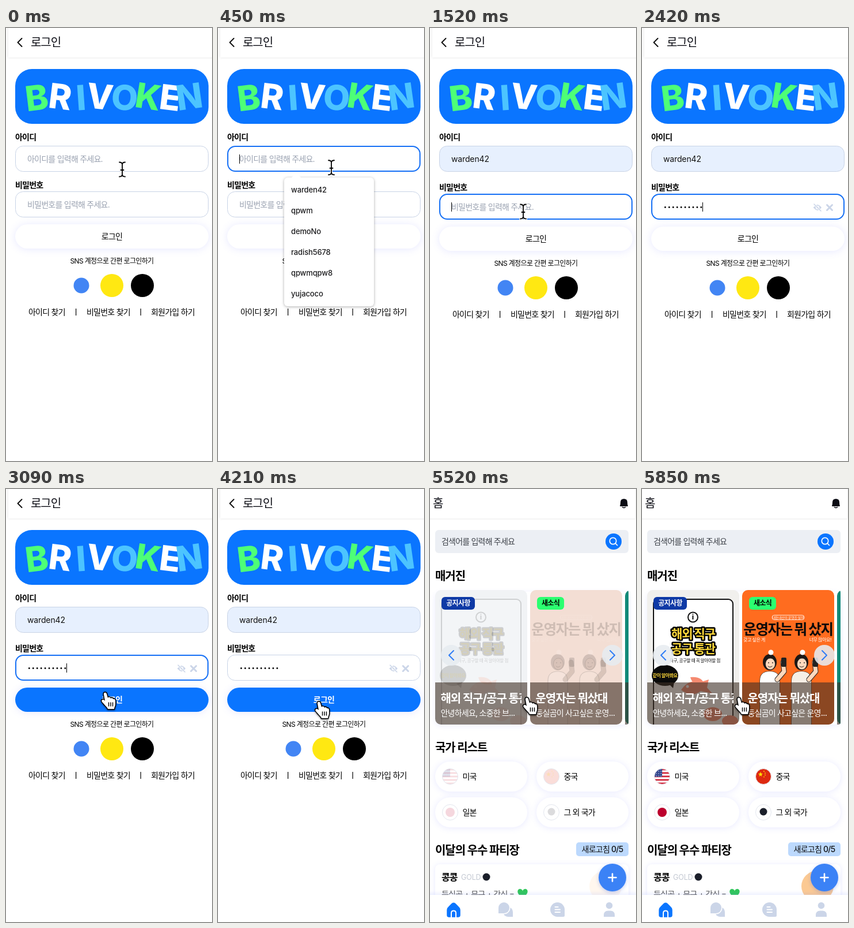
Recreate the animation shown at these times as an HTML page with a canvas. Size 358 by 750 pixels, loop 5.89 s.

```html
<!DOCTYPE html>
<html lang="ko">
<head>
<meta charset="utf-8">
<title>로그인</title>
<style>
html, body { margin: 0; width: 100%; height: 100%; overflow: hidden; background: #fff; }
canvas { display: block; width: 358px; height: 750px; }
</style>
</head>
<body>
<canvas id="stage"></canvas>
<script>
const W = 358, H = 750, LOOP = 5890;
const canvas = document.getElementById('stage');
const c = canvas.getContext('2d');
const dpr = window.devicePixelRatio || 1;
canvas.width = W * dpr;
canvas.height = H * dpr;

const BLUE = '#0a75ff', LINE = '#c8d3e6', INK = '#0b0c14', FILL = '#e7f0fe', ICON = '#cbd5e8';
const FONT = 'Inter, Pretendard, "Noto Sans CJK KR", "Noto Sans CJK", sans-serif';

// Moments of the story, in ms
const T = {
  focusId: 270, dropOpen: 360, pick: 1030, focusPw: 1480, type: 1700, move: 2700,
  hover: 2950, caretOff: 3300, submit: 3640, home: 4450, ready: 5390, images: 5480
};
const USER = 'warden42';
const SAVED = [USER, 'qpwm', 'demoNo', 'radish5678', 'qpwmqpw8', 'yujacoco'];

// Pointer path: time, x, y
const PATH = [
  [120, 202, 245], [260, 201, 232], [340, 201, 232], [680, 185, 271], [1060, 185, 271],
  [1460, 162, 318], [2700, 162, 318], [3060, 173, 353], [3120, 173, 353], [3270, 176, 369],
  [5180, 176, 369], [5260, 168, 359], [5330, 168, 359], [5500, 169, 362]
];

const clamp = v => Math.max(0, Math.min(1, v));
const ease = v => v * v * (3 - 2 * v);

function pointer(t) {
  let a = PATH[0];
  for (const b of PATH) {
    if (t < b[0]) {
      if (a === b) break;
      const k = ease(clamp((t - a[0]) / (b[0] - a[0])));
      return { x: a[1] + (b[1] - a[1]) * k, y: a[2] + (b[2] - a[2]) * k };
    }
    a = b;
  }
  return { x: a[1], y: a[2] };
}

function text(s, x, cy, size, weight = 400, color = INK, align = 'left') {
  c.font = `${weight} ${size}px ${FONT}`;
  c.letterSpacing = (/[가-힣]/.test(s) ? -0.054 : -0.01) * size + 'px';
  c.textAlign = align;
  c.fillStyle = color;
  c.fillText(s, x, cy + size * 0.37);
}

function box(x, y, w, h, r, fill, stroke, lw = 1) {
  c.beginPath();
  c.roundRect(x, y, w, h, r);
  if (fill) { c.fillStyle = fill; c.fill(); }
  if (stroke) { c.strokeStyle = stroke; c.lineWidth = lw; c.stroke(); }
}

function oval(x, y, rx, ry, fill, stroke, lw = 1) {
  c.beginPath();
  c.ellipse(x, y, rx, ry, 0, 0, Math.PI * 2);
  if (fill) { c.fillStyle = fill; c.fill(); }
  if (stroke) { c.strokeStyle = stroke; c.lineWidth = lw; c.stroke(); }
}
const dot = (x, y, r, fill, stroke, lw) => oval(x, y, r, r, fill, stroke, lw);

function path(d, x, y, fill, stroke, lw = 2) {
  const p = new Path2D(d);
  c.save();
  c.translate(x, y);
  c.lineCap = c.lineJoin = 'round';
  if (stroke) { c.strokeStyle = stroke; c.lineWidth = lw; c.stroke(p); }
  if (fill) { c.fillStyle = fill; c.fill(p); }
  c.restore();
}

function shadowed(color, blur, dy, draw) {
  c.save();
  c.shadowColor = color;
  c.shadowBlur = blur * dpr;
  c.shadowOffsetY = dy * dpr;
  draw();
  c.restore();
}

function faded(alpha, draw) {
  if (alpha <= 0) return;
  c.save();
  c.globalAlpha *= alpha;
  draw();
  c.restore();
}

function clipped(x, y, w, h, r, draw) {
  c.save();
  c.beginPath();
  c.roundRect(x, y, w, h, r);
  c.clip();
  draw();
  c.restore();
}

/* ---------- pointer shapes ---------- */

const ARROW = 'M0 0V23L5.5 18L9.3 27L13 25.4L9.2 16.8H16Z';
const HAND = 'M-3 3C-4-1 1-2 2 2L4 9C5 7 8 7 9 10C10 8 13 9 13 11C15 10 17 11 17 14V20C17 23 15 25 15 28H4C3 25-1 22-4 18C-7 15-8 13-5 12C-4 11-2 13-1 14Z';
const BEAM = 'M-5-12.5Q0-12.5 0-8.5V8.5Q0 12.5-5 12.5M5-12.5Q0-12.5 0-8.5M0 8.5Q0 12.5 5 12.5M-2.5 1H2.5';

function drawPointer(kind, { x, y }) {
  if (kind === 'beam') {
    path(BEAM, x, y, null, '#fff', 4);
    path(BEAM, x, y, null, '#000', 1.8);
  } else if (kind === 'hand') {
    shadowed('rgba(0,0,0,.35)', 3, 1.5, () => path(HAND, x, y, '#fff', '#000', 3));
    path('M5.5 17V23M9 17V23M12.5 17V23', x, y, null, '#000', 1.4);
  } else {
    shadowed('rgba(0,0,0,.35)', 3, 1.5, () => path(ARROW, x, y, '#000', '#fff', 3));
  }
}

/* ---------- login ---------- */

function header(x, w) {
  shadowed('rgba(0,0,0,.13)', 4, 0, () => box(x, -8, w, 59, 0, '#fff'));
}

function banner() {
  box(16, 71, 336, 95, 29, BLUE);
  const green = '#4dff77', sky = '#4cc4ff';
  const xs = [53, 94, 130, 163, 206, 247, 285, 318];
  const tints = [green, '#fff', sky, '#fff', sky, green, '#fff', sky];
  const tilt = [-7, 7, -4, 6, 5, 9, 7, -8];
  [...'BRIVOKEN'].forEach((ch, i) => {
    c.save();
    c.translate(xs[i], 119 + (i % 2 ? -1 : 1));
    c.rotate(tilt[i] * Math.PI / 180);
    text(ch, 0, 0, 60, 800, tints[i], 'center');
    c.restore();
  });
}

function field(y, focused, fill) {
  if (focused) box(17, y + 1, 334, 43, 13, fill, '#1670f5', 2);
  else box(16.5, y + 0.5, 335, 44, 13, fill, LINE);
}

function caret(x, cy) {
  c.fillStyle = '#000';
  c.fillRect(x, cy - 8, 1, 16);
}

function typedCount(t) {
  let n = 0;
  for (let i = 0; i < 8; i++) if (t >= T.type + i * 72) n++;
  return n + (t >= 2330) + (t >= 2420);
}

function passwordTools(y) {
  path('M-6.5 0Q0-9 6.5 0Q0 9-6.5 0Z', 305, y, ICON, ICON, 1);
  dot(305, y, 2.6, null, '#fff', 1.3);
  path('M-5-5L5 5', 305, y, null, '#fff', 3);
  path('M-6-6L6 6', 305, y, null, ICON, 1.6);
  path('M-4.5-4.5L4.5 4.5M4.5-4.5L-4.5 4.5', 326, y, null, ICON, 3);
}

function dropdown(t, hovering) {
  shadowed('rgba(0,0,0,.32)', 5, 1, () => {
    c.beginPath();
    c.roundRect(115, 259, 156, 223, 6);
    c.fillStyle = '#fff';
    c.fill();
  });
  path('M-9 1L0-8L9 1Z', 136, 259, '#fff');
  if (hovering) {
    box(119, 262, 148, 36, 4, '#eeeeee');
    path('M-4-4L4 4M4-4L-4 4', 249, 280, null, '#444', 1.5);
  }
  SAVED.forEach((name, i) => text(name, 127, 280.5 + i * 36, 13, 500, '#1c1c1e'));
}

function login(t, p) {
  const filled = t >= T.pick;
  const open = t >= T.dropOpen && t < T.pick + 120;
  const hovering = open && p.y > 262;
  const dy = filled ? 4 : 0;
  const idFocus = t >= T.focusId && t < T.focusPw;
  const pwFocus = t >= T.focusPw && t < T.submit;
  const hasText = filled || hovering;

  header(4, 370);
  path('M3.5-7L-3.5 0L3.5 7', 24, 25, null, '#111', 2);
  text('로그인', 43, 25, 20, 500);
  banner();

  text('아이디', 16, 189, 14, 600, '#000');
  field(204, idFocus, hasText ? FILL : '#fff');
  if (filled) text(USER, 37, 227, 14, 400, '#111');
  else if (hovering) text(USER, 37, 227.5, 13, 400, '#000');
  else text('아이디를 입력해 주세요.', 37, 227, 14, 400, '#9aa2b1');
  if (idFocus && !hasText) caret(37, 227);

  c.save();
  c.translate(0, dy);
  text('비밀번호', 16, 272, 14, 600, '#000');
  field(283, pwFocus, '#fff');
  const n = typedCount(t);
  if (n) {
    for (let i = 0; i < n; i++) dot(40.3 + i * 6.95, 306.5, 1.4, '#000');
    passwordTools(307);
  } else {
    text('비밀번호를 입력해 주세요.', 37, 306, 14, 400, '#9aa2b1');
  }
  if (pwFocus && t < T.caretOff) caret(37 + n * 6.8, 306);

  const hot = clamp((t - T.hover) / 110);
  shadowed('rgba(110,120,255,.17)', 14, 1, () => box(16, 340, 336, 42, 21, '#fff'));
  faded(1 - hot, () => text('로그인', 184, 361, 14, 500, '#000', 'center'));
  faded(hot, () => {
    box(16, 340, 336, 42, 21, BLUE);
    text('로그인', 184, 361, 14, 600, '#fff', 'center');
  });

  text('SNS 계정으로 간편 로그인하기', 184, 404, 12, 400, '#000', 'center');
  dot(131, 446, 13.5, '#4285f4');
  dot(184, 446, 20, '#ffe812');
  dot(237, 446, 20, '#000');
  text('아이디 찾기', 39, 492, 14, 400, '#000');
  text('비밀번호 찾기', 140, 492, 14, 400, '#000');
  text('회원가입 하기', 252, 492, 14, 400, '#000');
  c.fillStyle = '#000';
  c.fillRect(121, 486, 1.2, 12);
  c.fillRect(233.5, 486, 1.2, 12);
  c.restore();

  if (open) {
    const alpha = t < T.pick ? clamp((t - T.dropOpen) / 60) : 1 - (t - T.pick) / 120;
    faded(alpha, () => dropdown(t, hovering));
  }

  if (t >= T.type && t < T.move) return;
  const within = (a, b) => p.y >= a && p.y <= b;
  let kind = 'arrow';
  if (open && within(258, 482)) kind = 'arrow';
  else if (within(204, 249) || within(283 + dy, 328 + dy)) kind = 'beam';
  else if (within(340 + dy, 382 + dy)) kind = 'hand';
  drawPointer(kind, p);
}

/* ---------- home ---------- */

function loader() {
  for (let i = 0; i < 5; i++) dot(113 + i * 32, 338, 12, BLUE);
  text('열심히 불러오는 중', 177, 372, 18, 500, '#000', 'center');
}

function nav() {
  shadowed('rgba(110,140,255,.2)', 8, -1, () => box(-10, 703, 378, 60, 0, '#fff'));
  path('M-11 0Q-11-3-8-5.5L-3-10.5Q0-13 3-10.5L8-5.5Q11-3 11 0V9Q11 12 8 12H-8Q-11 12-11 9Z', 41, 729, BLUE, BLUE, 1.5);
  path('M-4 13V5.5Q-4 1.5 0 1.5T4 5.5V13', 41, 729, null, '#fff', 2);
  path('M8 17H0A8.5 8.5 0 1 1 8.5 8.5V17Z', 135.5, 724, ICON);
  path('M-9.5 9.5V0A9.5 9.5 0 1 1 0 9.5Z', 128.5, 725.5, ICON, '#fff', 3);
  path('M12.5 10Q12.5 12.5 10 12.5H0A12.5 12.5 0 1 1 12.5 0Z', 221.5, 728.5, ICON);
  path('M-4-4.5H1M-4 0H4.5M-4 4.5H4.5', 221.5, 728.5, null, '#fff', 2);
  dot(311.5, 721.5, 5.8, ICON);
  path('M-9.5 12V9Q-9.5 1.5-2 1.5H2Q9.5 1.5 9.5 9V12Z', 311.5, 729, ICON);
}

function addButton() {
  shadowed('rgba(60,100,230,.3)', 6, 2, () => dot(317, 673, 24, '#3b82f6'));
  path('M-6.5 0H6.5M0-6.5V6.5', 317, 673, null, '#fff', 2.6);
}

function badge(s, x, w, fill, color) {
  box(x, 187, w, 22, 6, fill);
  text(s, x + w / 2, 198, 12, 700, color, 'center');
}

function outlined(s, x, cy, size, fill) {
  c.font = `900 ${size}px ${FONT}`;
  c.letterSpacing = -0.054 * size + 'px';
  c.textAlign = 'center';
  c.lineJoin = 'round';
  c.lineWidth = 5;
  c.strokeStyle = '#000';
  c.strokeText(s, x, cy + size * 0.37);
  text(s, x, cy, size, 900, fill, 'center');
}

function noticeArt() {
  box(9, 175, 160, 233, 0, '#f1f0ed');
  box(20, 191, 138, 240, 8, '#fff', '#111', 2);
  dot(88.5, 222, 8.5, null, '#111', 2);
  text('i', 88.5, 222, 12, 800, '#111', 'center');
  outlined('해외 직구', 89, 250, 21, '#ffd93b');
  outlined('공구 통관', 89, 276, 21, '#ffd93b');
  text('직구, 공구할 때 꼭 알아야할 점', 92, 297, 7.5, 500, '#111', 'center');
  oval(40, 323, 23, 18, '#0a0a0a');
  path('M0 0L8 8L10-3Z', 46, 337, '#0a0a0a');
  text('같이 알아봐요', 40, 323, 8, 700, '#ffd93b', 'center');
  const salmon = '#f58a70';
  path('M0 12Q14-8 32-1L48-6L45 8L54 18L34 14Q18 26 0 12Z', 68, 336, salmon);
  path('M0 0Q4 16 24 12Q20-2 0 0Z', 84, 326, salmon);
  dot(79, 342, 2.5, '#fff');
  oval(123, 390, 16, 12, salmon);
  oval(153, 402, 14, 10, salmon);
}

function shopper(x, flip, hair, shirt) {
  c.save();
  c.translate(x, 0);
  c.scale(flip, 1);
  path('M-17 408V332Q-17 316 0 316T17 332V408Z', 0, 0, shirt, '#222', 1.2);
  path('M13 330L25 316L23 300', 0, 0, null, '#222', 9);
  path('M13 330L25 316L23 300', 0, 0, null, '#ffd9bd', 7);
  oval(0, 300, 12, 14, hair);
  oval(1, 303, 8.5, 10, '#ffd9bd', '#222', 0.8);
  path('M-4 0Q-1 3 3 0', 1, 307, null, '#222', 1);
  dot(-2, 301, 0.9, '#222');
  dot(5, 301, 0.9, '#222');
  dot(2, 283, 4.5, '#fff');
  box(20, 292, 9, 16, 2, '#222');
  c.restore();
}

function newsArt() {
  box(174, 175, 160, 233, 0, '#ff6c1f');
  box(226, 218.5, 56, 8, 4, null, '#fff', 0.8);
  text('내돈내산의 운영진 살까', 254, 222.5, 6, 500, '#fff', 'center');
  text('운영자는 뭐 샀지', 254, 243, 24.5, 900, '#0a0a0a', 'center');
  text('갖고 싶은 게', 176, 261, 8, 500, '#fff');
  text('너무 많아요!', 329, 261, 8, 500, '#fff', 'right');
  shopper(222, 1, '#1c1715', '#fff');
  shopper(277, 1, '#1c1715', '#f6efe6');
}

function slide(x, art, alpha, title, sub) {
  clipped(x, 175, 160, 233, 10, () => {
    box(x, 175, 160, 233, 0, '#f1f3f7');
    faded(alpha, art);
    box(x, 335, 160, 73, 0, 'rgba(62,48,38,.6)');
    clipped(x + 9, 340, 141, 66, 0, () => {
      text(title, x + 9.5, 363, 20, 700, '#fff');
      text(sub, x + 9.5, 388, 14, 500, '#fff');
    });
  });
}

function arrowButton(x, dir) {
  dot(x, 288, 18, 'rgba(232,236,241,.88)');
  path(`M${-4 * dir}-8L${4 * dir} 0L${-4 * dir} 8`, x, 288, null, '#2f7df6', 2);
}

function carousel(alpha) {
  shadowed('rgba(110,120,255,.14)', 10, 2, () => box(9, 178, 336, 230, 10, '#fff'));
  clipped(9, 175, 336, 233, 4, () => {
    slide(9, noticeArt, alpha, '해외 직구/공구 통관', '안녕하세요, 소중한 브...');
    slide(174, newsArt, alpha, '운영자는 뭐샀대', '둥실곰이 사고싶은 운영...');
    box(339, 175, 160, 233, 10, '#128a78');
    box(339, 335, 160, 73, 0, 'rgba(62,48,38,.6)');
  });
  badge('공지사항', 20, 58, '#0f3aa6', '#fff');
  badge('새소식', 186, 47, '#2bff70', '#000');
  arrowButton(37, -1);
  arrowButton(317, 1);
}

const FLAGS = {
  '미국'(x, y) {
    for (let i = 0; i < 9; i++) box(x - 14, y - 13.5 + i * 3, 28, 3, 0, i % 2 ? '#fff' : '#d2283c');
    box(x - 14, y - 14, 14, 14.5, 0, '#33478f');
    for (let i = 0; i < 9; i++) dot(x - 10 + (i % 3) * 4, y - 9 + Math.floor(i / 3) * 4, 0.7, '#fff');
  },
  '중국'(x, y) {
    box(x - 14, y - 14, 28, 28, 0, '#de2910');
    path('M0-4L1.2-1.2L4-1L1.8 1L2.5 4L0 2.3L-2.5 4L-1.8 1L-4-1L-1.2-1.2Z', x - 5, y - 4, '#ffde00');
    for (let i = 0; i < 4; i++) dot(x + 1 + (i % 3 ? 2 : 0), y - 9 + i * 3.2, 0.9, '#ffde00');
  },
  '일본'(x, y) {
    box(x - 14, y - 14, 28, 28, 0, '#fff');
    dot(x, y, 8, '#bc002d');
  },
  '그 외 국가'(x, y) {
    box(x - 14, y - 14, 28, 28, 0, '#fff');
    dot(x, y - 1, 6.5, '#1b1f2a');
  }
};

function countries(alpha) {
  Object.keys(FLAGS).forEach((name, i) => {
    const x = 9 + (i % 2) * 176, y = 472 + Math.floor(i / 2) * 62;
    shadowed('rgba(110,120,255,.16)', 12, 1, () => box(x, y, 160, 52, 26, '#fff'));
    faded(alpha, () => clipped(x + 12.5, y + 12.5, 27, 27, 13.5, () => FLAGS[name](x + 26, y + 26)));
    dot(x + 26, y + 26, 13.5, null, '#e3e6ee', 1);
    text(name, x + 47.5, y + 25.5, 14, 500, '#000');
  });
}

function leaders(alpha) {
  text('이달의 우수 파티장', 9, 626, 20, 700, '#000');
  box(254, 612, 91, 24, 5, '#bcd9fd');
  text('새로고침 0/5', 299.5, 624, 14, 500, '#111', 'center');
  shadowed('rgba(110,120,255,.16)', 10, 1, () => box(9, 650, 336, 110, 8, '#fff'));
  text('콩콩', 20, 672, 16, 700, '#000');
  text('GOLD', 54, 672, 12.5, 400, '#c3c8d2');
  dot(98, 672, 6.5, '#1b1f2a');
  text('둥실곰 + 문구 + 간식 =', 20, 702, 14, 400, '#555');
  path('M0 8C-14-1-8-9-3-7Q0-6 0-3Q0-6 3-7C8-9 14-1 0 8Z', 161, 700, '#2fc65a');
  faded(alpha, () => oval(305, 688, 28, 27, '#fbc993'));
}

function content(t) {
  const alpha = clamp((t - T.images) / 260);
  box(9, 71, 336, 40, 6, '#eceff4');
  text('검색어를 입력해 주세요', 20, 91, 14, 500, '#3c4048');
  dot(319, 91, 14, BLUE);
  dot(318, 90, 5.7, null, '#fff', 1.7);
  path('M0 0L3 3', 322.5, 94.5, null, '#fff', 1.7);
  text('매거진', 9, 151, 20, 700, '#000');
  carousel(alpha);
  text('국가 리스트', 9, 448, 20, 700, '#000');
  countries(alpha);
  leaders(alpha);
}

function home(t, p) {
  const ready = t >= T.ready;
  if (ready) content(t); else loader();
  header(-10, 367);
  text('홈', 5, 25, 20, 500);
  path('M-7 4Q-6 2-6-2Q-6-8 0-8T6-2Q6 2 7 4Q7 5 6 5H-6Q-7 5-7 4Z', 337, 25, INK);
  path('M-2.5 6.5Q0 8.5 2.5 6.5', 337, 25, null, INK, 1.6);
  nav();
  addButton();
  drawPointer(ready ? 'hand' : 'arrow', p);
}

/* ---------- loop ---------- */

const start = performance.now();

function frame() {
  const t = (performance.now() - start) % LOOP;
  c.setTransform(dpr, 0, 0, dpr, 0, 0);
  c.fillStyle = '#fff';
  c.fillRect(0, 0, W, H);
  (t < T.home ? login : home)(t, pointer(t));
  requestAnimationFrame(frame);
}
frame();
</script>
</body>
</html>
```
